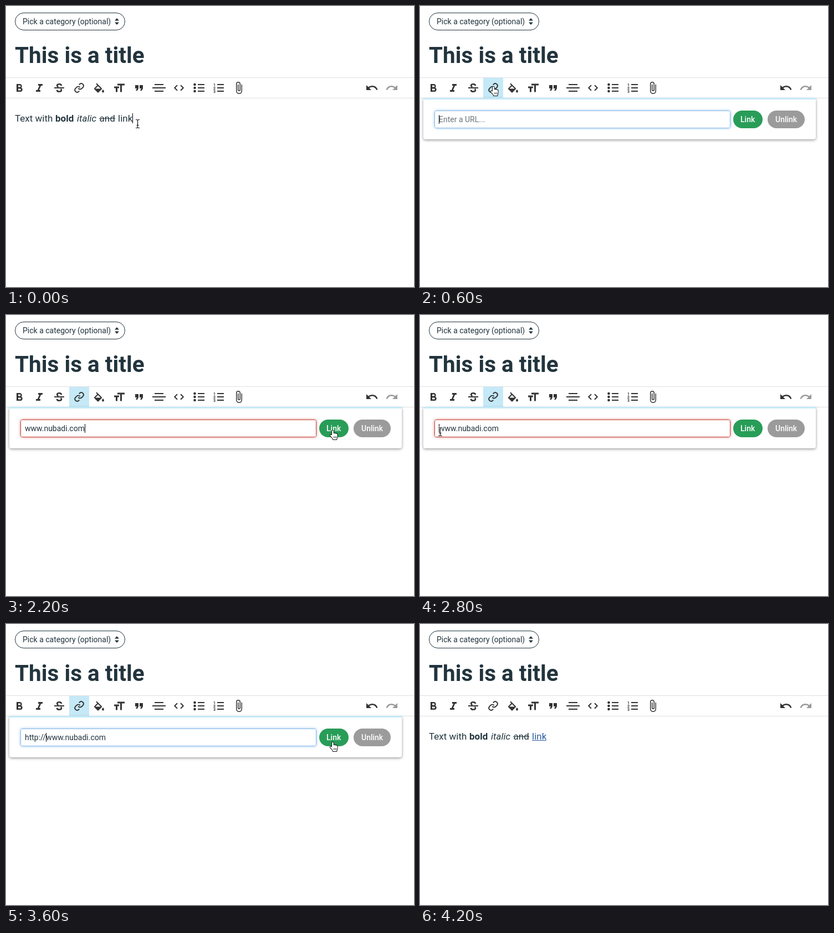
Write an HTML page with a canvas that moves like this. It is 736 px wide and 508 px high and loops after 4.8 s.

```html
<!DOCTYPE html>
<html lang="en">
<head>
<meta charset="utf-8">
<title>Adding a link</title>
<style>
html, body { margin: 0; width: 100%; height: 100%; overflow: hidden; background: #fff; }
canvas { display: block; }
</style>
</head>
<body>
<canvas id="stage" width="736" height="508"></canvas>
<script>
const ctx = document.getElementById('stage').getContext('2d');
const LOOP = 4800;
const INK = '#22343d', ICON = '#333', PALE_BLUE = '#c5e9f7';
const FONT = 'Roboto, "Open Sans", sans-serif';
const ADDRESS = 'www.nubadi.com';

// Each step overrides part of the state built up by the steps before it.
const steps = [
  { at: 0, pointer: ['beam', 237, 213], bodyCaret: true },
  { at: 200, pointer: ['beam', 204, 204], bodyCaret: false, selected: true },
  { at: 400, pointer: ['hand', 127, 145] },
  { at: 600, popup: true, active: true, url: '', caret: 0 },
  { at: 800, pointer: null },
  { at: 1000, caret: -1 },
  { at: 1200, url: ADDRESS.slice(0, 2), caret: 2 },
  { at: 1400, url: ADDRESS.slice(0, 8), caret: 8 },
  { at: 1600, url: ADDRESS, caret: 14 },
  { at: 1800, pointer: ['arrow', 181, 178] },
  { at: 2000, pointer: ['hand', 584, 207] },
  { at: 2200, pointer: ['hand', 584, 208], error: true },
  { at: 2400, pointer: ['beam', 440, 270] },
  { at: 2600, pointer: ['beam', 110, 213] },
  { at: 2800, pointer: ['beam', 36, 211], caret: 0 },
  { at: 3000, pointer: null, url: 'ht' + ADDRESS, caret: 2 },
  { at: 3200, url: 'http:/' + ADDRESS, caret: 6, error: false },
  { at: 3400, url: 'http://' + ADDRESS, caret: 7, pointer: ['arrow', 560, 224] },
  { at: 3600, pointer: ['hand', 584, 213] },
  { at: 3800, popup: false, linked: true, pointer: ['beam', 590, 221] },
  { at: 4000, pointer: ['beam', 570, 306] },
  { at: 4200, pointer: null, selected: false, active: false }
];

const stateAt = time => Object.assign({}, ...steps.filter(s => s.at <= time));

function write(str, x, y, size, color = INK, style = '') {
  ctx.font = `${style} ${size}px ${FONT}`;
  ctx.fillStyle = color;
  ctx.fillText(str, x, y);
}

function rect(x, y, w, h, color) {
  ctx.fillStyle = color;
  ctx.fillRect(x, y, w, h);
}

function roundRect(x, y, w, h, r, fill, stroke) {
  ctx.beginPath();
  ctx.roundRect(x, y, w, h, r);
  if (fill) { ctx.fillStyle = fill; ctx.fill(); }
  if (stroke) { ctx.strokeStyle = stroke; ctx.lineWidth = 1; ctx.stroke(); }
}

function shadow(color, blur, dy = 0) {
  ctx.shadowColor = color;
  ctx.shadowBlur = blur;
  ctx.shadowOffsetY = dy;
}

// Draws a path with its local origin at x, y; a line width means an outline.
function shape(d, x, y, { fill = ICON, line = 0, stroke = ICON, scale = 1, flip = 1 } = {}) {
  const path = new Path2D(d);
  ctx.save();
  ctx.translate(x, y);
  ctx.scale(scale * flip, scale);
  if (line) {
    ctx.lineWidth = line;
    ctx.strokeStyle = stroke;
    ctx.stroke(path);
  }
  if (fill) {
    ctx.fillStyle = fill;
    ctx.fill(path, 'evenodd');
  }
  ctx.restore();
}

const glyphs = {
  bold: 'M7 4h6.2a4 4 0 0 1 2.4 6.8A3.8 3.8 0 0 1 14 18H7zM10 6.5v3h3a1.5 1.5 0 0 0 0-3zM10 12.5v3h3.5a1.5 1.5 0 0 0 0-3z',
  italic: 'M10 4v3h2.2l-3.4 8H6v3h8v-3h-2.2l3.4-8H18V4z',
  strike: 'M16 8C15.8 6 14.2 5.2 12.1 5.2C9.7 5.2 8.2 6.2 8.2 7.8C8.2 9 9 9.8 10.5 10.4M14.6 14C15.5 14.6 16 15.2 16 16C16 17.8 14.5 18.8 12 18.8C9.5 18.8 8 17.8 7.9 15.6',
  link: 'M10 13a5 5 0 0 0 7.5.5l3-3a5 5 0 0 0-7-7l-1.8 1.7M14 11a5 5 0 0 0-7.5-.5l-3 3a5 5 0 0 0 7 7l1.8-1.7',
  bucket: 'M16.6 8.9L7.6 0 6.2 1.4l2.4 2.4-5.2 5.1a1.5 1.5 0 0 0 0 2.2l5.5 5.5a1.5 1.5 0 0 0 2.2 0l5.5-5.5a1.5 1.5 0 0 0 0-2.2zM5.2 10L10 5.2 14.8 10zM19 11.5s-2 2.2-2 3.5a2 2 0 0 0 4 0c0-1.3-2-3.5-2-3.5z',
  size: 'M9 4v3h5v12h3V7h5V4zM3 12h3v7h3v-7h3V9H3z',
  quote: 'M6 17h3l2-4V7H5v6h3zM14 17h3l2-4V7h-6v6h3z',
  code: 'M9 7.3L4.2 12 9 16.7M15 7.3L19.8 12 15 16.7',
  clip: 'M16.5 6v11.5a4 4 0 0 1-8 0V5a2.5 2.5 0 0 1 5 0v10.5a1 1 0 0 1-2 0V6H10v9.5a2.5 2.5 0 0 0 5 0V5a4 4 0 0 0-8 0v12.5a5.5 5.5 0 0 0 11 0V6z',
  undo: 'M12.5 8a10.500 10.500 0 0 0-6.900 2.600L2 7v9h9l-3.600-3.600A8 8 0 0 1 20.100 16l2.400-.8A10.500 10.500 0 0 0 12.500 8z'
};

const pointers = {
  hand: 'M4 9.5V2.200a1.400 1.400 0 0 1 2.800 0V6.500a1.300 1.300 0 0 1 2.500.200 1.200 1.200 0 0 1 2.300.500 1.100 1.100 0 0 1 2 .700V11.500L12.300 17H6L5 14.500 1.200 10.600a1.200 1.200 0 0 1 1.800-1.600z',
  arrow: 'M0 0v15l3.500-3.300 2.200 5 2.200-1-2.200-4.800h4.700z',
  beam: 'M-3.500-7.500H-2Q0-7.500 0-6Q0-7.500 2-7.500H3.500M0-6V6M-2 2.500H2M-3.500 7.500H-2Q0 7.500 0 6Q0 7.500 2 7.500H3.500'
};

function drawHeader() {
  roundRect(16.5, 12.5, 198, 31, 15.5, '#fff', INK);
  write('Pick a category (optional)', 30, 33, 14);
  shape('M-4 0L0-4.500 4 0zM-4 3L0 7.500 4 3z', 200, 26.5, { fill: INK });
  write('This is a title', 16, 103, 40.5, INK, 'bold');
}

function drawToolbar(active) {
  rect(0, 129, 736, 1, '#dfdfdf');
  rect(0, 166, 736, 1, '#dfdfdf');
  if (active) rect(114, 130, 36, 36, PALE_BLUE);

  shape(glyphs.bold, 12, 137);
  shape(glyphs.italic, 48, 137);
  shape(glyphs.strike, 84, 136, { fill: null, line: 2.6 });
  rect(87, 147, 18, 2, ICON);
  shape(glyphs.link, 122.2, 138.2, { fill: null, line: 2.3, scale: 0.82 });
  shape(glyphs.bucket, 156, 139.5);
  shape(glyphs.size, 192, 136.5);
  shape(glyphs.quote, 228, 136);
  for (const i of [-1, 0, 1]) {
    const y = 148 + i * 6, inset = i ? 4 : 0;
    rect(264 + inset, y - 1, 24 - 2 * inset, 2, ICON);
    shape('M-2.300 0a2.300 2.300 0 0 0 4.600 0a2.300 2.300 0 0 0-4.600 0z', 340.5, y);
    rect(346, y - 1, 12, 2, ICON);
    rect(381, y - 1, 12, 2, ICON);
    write(i + 2, 374, y + 2.5, 7, ICON, 'bold');
  }
  shape(glyphs.code, 300, 136, { fill: null, line: 1.9 });
  shape(glyphs.clip, 408, 136);
  shape(glyphs.undo, 648, 136);
  shape(glyphs.undo, 708, 136, { fill: '#999', flip: -1 });
}

function drawBody({ selected, linked, bodyCaret }) {
  const blue = '#2d5a9e', base = 209;
  if (selected) rect(202, 193, 26, 20, '#b9c8d6');
  write('Text with', 16, base, 17);
  write('bold', 89, base, 17, INK, 'bold');
  write('italic', 128, base, 17, INK, 'italic');
  write('and', 168.5, base, 17);
  rect(168, 203, 29, 1, INK);
  write('link', 202, base, 17, linked ? blue : INK);
  if (linked) rect(202, 210, 26, 1, blue);
  if (bodyCaret) rect(228, 194, 1, 18, '#000');
}

function drawButton(label, x, w, textX, color) {
  roundRect(x, 189, w, 32, 16, color);
  write(label, textX, 210, 14, '#fff', '500');
}

function drawPopup({ url, caret, error }) {
  shadow('rgba(0,0,0,.42)', 5, 1.5);
  roundRect(6, 167, 708, 74, [0, 0, 4, 4], '#fff');
  shadow('transparent', 0);
  rect(6, 166, 708, 3, PALE_BLUE);

  shadow(error ? 'rgba(205,60,45,.6)' : 'rgba(90,165,235,.6)', 4);
  roundRect(26.5, 189.5, 533, 31, 3.5, '#fff', error ? '#c4473c' : '#8dbbe8');
  shadow('transparent', 0);
  roundRect(27, 190, 532, 30, 3, '#fff');

  if (url) write(url, 34, 210, 14);
  else write('Enter a URL...', 34, 210, 14, '#69757c');
  if (caret >= 0) {
    const x = 34 + ctx.measureText(url.slice(0, caret)).width;
    rect(Math.round(x), 197, 1, 16, '#000');
  }
  drawButton('Link', 565, 53, 578, '#289d58');
  drawButton('Unlink', 627, 67, 641, '#9b9b9b');
}

function drawPointer([kind, x, y]) {
  const d = pointers[kind];
  if (kind === 'beam') {
    shape(d, x + 0.5, y, { fill: null, line: 3, stroke: '#fff' });
    shape(d, x + 0.5, y, { fill: null, line: 1.2, stroke: '#111' });
  } else if (kind === 'hand') {
    shape(d, x, y, { fill: '#fff', line: 2, stroke: '#111' });
    shape('M7.500 11.500v3M9.500 11.500v3M11.500 11.500v3', x, y, { fill: null, line: 0.8, stroke: '#111' });
  } else {
    shape(d, x, y, { fill: '#111', line: 2, stroke: '#fff' });
  }
}

function draw() {
  const state = stateAt(performance.now() % LOOP);
  rect(0, 0, 736, 508, '#fff');
  drawHeader();
  drawToolbar(state.active);
  if (state.popup) drawPopup(state);
  else drawBody(state);
  if (state.pointer) drawPointer(state.pointer);
  requestAnimationFrame(draw);
}
draw();
</script>
</body>
</html>
```
